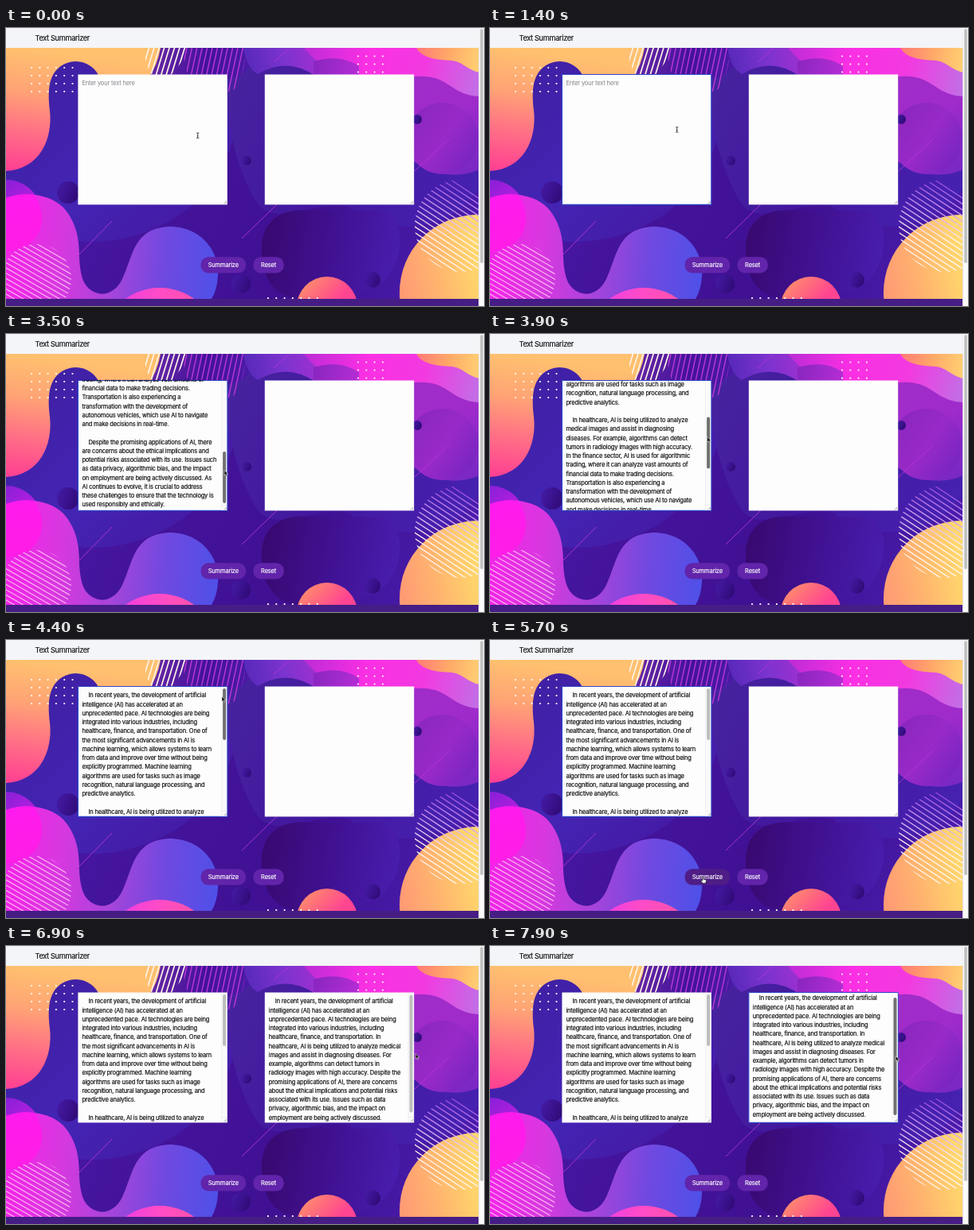
Animation, 600 px wide and 350 px high, one loop 8 s. Source, as an HTML page:

```html
<!DOCTYPE html>
<html lang="en">
<head>
<meta charset="utf-8">
<title>Text Summarizer</title>
<style>
html, body { margin: 0; width: 100%; height: 100%; overflow: hidden; background: #fff; }
svg { display: block; width: 600px; height: 350px; }
text { font: 7.5px Inter, Roboto, sans-serif; letter-spacing: -.18px; stroke-width: .16px; }
</style>
</head>
<body>
<svg id="stage" viewBox="0 0 600 350">
  <defs>
    <clipPath id="art"><rect y="25" width="593.5" height="316"/></clipPath>
    <clipPath id="hatchA"><path d="M176 25H226Q222 46 206 60H184Q176 50 174 34Z"/></clipPath>
    <clipPath id="hatchB"><path d="M222 25H301Q300 62 284 80H240Q224 60 222 26Z"/></clipPath>
    <clipPath id="hatchC"><circle cx="571" cy="249" r="58"/></clipPath>
    <clipPath id="hatchD"><circle cx="38" cy="316" r="44"/></clipPath>
  </defs>
  <g id="backdrop" clip-path="url(#art)"></g>
  <rect y="341" width="593.5" height="9" fill="#451d85"/>
  <rect width="594" height="25" fill="#f3f5f8"/>
  <text x="36.5" y="16" style="font-size:9.2px;letter-spacing:-.32px" fill="#101012" stroke="#101012">Text Summarizer</text>
  <rect x="593.5" width="6.5" height="350" fill="#fafafa"/>
  <rect x="593.5" width=".5" height="350" fill="#e6e6e6"/>
  <rect x="595.3" y="1" width="3.6" height="295" rx="1.8" fill="#bfbfbf"/>
  <g id="ui"></g>
  <g id="cursor"></g>
</svg>
<script>
const NS = 'http://www.w3.org/2000/svg';
const $ = id => document.getElementById(id);

function add(parent, tag, attrs, text) {
  const el = document.createElementNS(NS, tag);
  for (const k in attrs) el.setAttribute(k, attrs[k]);
  if (text) el.textContent = text;
  parent.appendChild(el);
  return el;
}

// ---- backdrop ----
const art = $('backdrop'), defs = document.querySelector('defs');
let gradCount = 0;

// Linear gradient from (x1,y1) to (x2,y2) in stage units.
function grad(x1, y1, x2, y2, ...colors) {
  const id = 'g' + gradCount++;
  const g = add(defs, 'linearGradient', { id, x1, y1, x2, y2, gradientUnits: 'userSpaceOnUse' });
  colors.forEach((c, i) => add(g, 'stop', { offset: i / (colors.length - 1), 'stop-color': c }));
  return `url(#${id})`;
}
const shape = (d, fill) => add(art, 'path', { d, fill });
const disc = (cx, cy, r, fill) => add(art, 'circle', { cx, cy, r, fill });
const line = (d, stroke, w, more) => add(art, 'path', { d, stroke, 'stroke-width': w, fill: 'none', ...more });

function dots(x0, y0, cols, rows) {
  for (let r = 0; r < rows; r++)
    for (let c = 0; c < cols; c++) disc(x0 + c * 10.3, y0 + r * 10, 1.1, '#fff');
}

function hatch(clip, x, y, dx, dy, stepX, stepY, n, stroke, w) {
  let d = '';
  for (let i = 0; i < n; i++) d += `M${x + i * stepX} ${y + i * stepY}l${dx} ${dy}`;
  line(d, stroke, w, { 'clip-path': `url(#${clip})` });
}

function drawBackdrop() {
  add(art, 'rect', { y: 25, width: 594, height: 317, fill: grad(0, 60, 594, 300, '#4a1cae', '#44149c', '#3f1092', '#4a1eaf') });
  // blue blobs
  shape('M0 170Q40 168 54 130V25H300C305 100 282 180 235 222C190 262 120 278 70 264C30 252 0 225 0 190Z',
    grad(50, 50, 250, 260, '#3f20a4', '#4424b4', '#4418a2'));
  shape('M278 60C300 40 350 40 400 60H593V200C560 260 470 262 430 225C390 215 345 250 318 224C300 200 272 130 278 60Z',
    grad(280, 60, 590, 220, '#46239f', '#42179e', '#4622b2'));
  shape('M321 284C318 244 345 226 380 230H470C505 236 500 300 470 322C440 341 405 345 365 341C335 336 323 315 321 284Z',
    grad(320, 260, 500, 290, '#38096f', '#401192', '#4a1eb0'));

  // top edge
  shape('M180 25H320Q306 64 270 64H180Z', grad(190, 26, 310, 50, '#6426a6', '#43129a', '#4b1ba6'));
  shape('M298 25H400Q410 48 388 60Q352 36 316 58Q302 50 298 25Z', grad(298, 50, 400, 30, '#5428b8', '#7c33cf', '#a52fd0'));
  shape('M508 56H594V178C570 190 530 186 508 164Z',
    grad(512, 60, 594, 170, '#a02cc8', '#a02bcb', '#7a28c4'));
  shape('M374 25H594V86C570 85 562 74 546 66C522 55 500 66 480 60C430 62 400 58 374 25Z',
    grad(380, 30, 594, 80, '#c02cd6', '#fb2fe4', '#f23ae0', '#c070e6'));
  shape('M386 42Q420 32 443 48V60H386Z', grad(386, 45, 443, 55, '#8a26c0', '#b42dd4'));
  disc(548, 139, 45, grad(505, 110, 592, 170, '#8a26bd', '#982ac8', '#7424c0'));
  shape('M515 25H594V56C578 52 574 43 560 41C540 40 522 38 515 25Z', grad(515, 30, 594, 40, '#ff7a78', '#ffa868', '#ffcf72'));

  // peach corner
  shape('M0 25H194Q190 48 178 64H118C112 46 92 37 74 45C53 55 52 78 55 104C59 140 42 178 0 180Z',
    grad(30, 28, 10, 180, '#ffc06f', '#ffa375', '#ff6f86', '#ff3f92'));

  // lower left
  disc(0, 236, 45, grad(0, 192, 45, 250, '#8a1fd8', '#b01fde', '#a019d4'));
  shape('M0 214C26 205 56 210 72 226C88 244 92 264 92 290C93 308 96 321 104 328C118 340 136 336 146 316C160 286 160 252 205 250C246 250 268 282 266 312Q265 330 258 341H0Z',
    grad(0, 270, 266, 290, '#f423e8', '#d838e0', '#a844da', '#7049e0', '#4f50e8'));
  shape('M0 214C14 209 28 208 36 211Q45 224 45 240C45 264 26 281 0 281Z', grad(0, 212, 20, 281, '#ff1bee', '#ff1de6'));
  disc(193, 400, 73, grad(150, 330, 237, 341, '#f040de', '#ff4cc6', '#ff52ac'));

  // lower right
  disc(592, 333, 98, grad(494, 320, 594, 300, '#ff9a74', '#ffb66e', '#ffd86c'));
  disc(403, 351, 38, grad(385, 315, 415, 345, '#ff8670', '#ff6480', '#ff4492'));

  // shaded balls
  [[78, 207, 14], [302, 167, 6], [516, 115, 6], [295, 322, 12], [460, 317, 10]].forEach(([x, y, r]) =>
    disc(x, y, r, grad(x - r, y - r * .4, x + r, y + r * .4, '#431aa2', '#3a128e', '#2f0a74')));

  hatch('hatchA', 181, 20, -14, 46, 6.4, 0, 10, '#fff2e6', 1.7);
  hatch('hatchB', 228, 20, -14, 66, 6.4, 0, 15, '#b535d4', 1.5);
  hatch('hatchC', 505, 156, 100, 66, 0, 7.4, 22, grad(560, 190, 545, 300, '#8c3fdc', '#c890ee', '#fff4ea', '#fff4ea'), 1.4);
  hatch('hatchD', -8, 238, 100, 58, 0, 6.6, 18, '#ffb4f2', 1.2);

  line('M88 289L133 243M296 265L340 222M513 180L557 139M336 43L355 26', '#b435d4', .9);
  dots(32, 50, 6, 4);
  dots(442, 35.5, 4, 3);
  dots(329, 340, 7, 1);
}
drawBackdrop();

// ---- interface ----
// A leading ">" marks an indented paragraph start.
const article = `>In recent years, the development of artificial
intelligence (AI) has accelerated at an
unprecedented pace. AI technologies are being
integrated into various industries, including
healthcare, finance, and transportation. One of
the most significant advancements in AI is
machine learning, which allows systems to learn
from data and improve over time without being
explicitly programmed. Machine learning
algorithms are used for tasks such as image
recognition, natural language processing, and
predictive analytics.

>In healthcare, AI is being utilized to analyze
medical images and assist in diagnosing
diseases. For example, algorithms can detect
tumors in radiology images with high accuracy.
In the finance sector, AI is used for algorithmic
trading, where it can analyze vast amounts of
financial data to make trading decisions.
Transportation is also experiencing a
transformation with the development of
autonomous vehicles, which use AI to navigate
and make decisions in real-time.

>Despite the promising applications of AI, there
are concerns about the ethical implications and
potential risks associated with its use. Issues such
as data privacy, algorithmic bias, and the impact
on employment are being actively discussed. As
AI continues to evolve, it is crucial to address
these challenges to ensure that the technology is
used responsibly and ethically.`;

const summary = `>In recent years, the development of artificial
intelligence (AI) has accelerated at an
unprecedented pace. AI technologies are being
integrated into various industries, including
healthcare, finance, and transportation. In
healthcare, AI is being utilized to analyze medical
images and assist in diagnosing diseases. For
example, algorithms can detect tumors in
radiology images with high accuracy. Despite the
promising applications of AI, there are concerns
about the ethical implications and potential risks
associated with its use. Issues such as data
privacy, algorithmic bias, and the impact on
employment are being actively discussed.`;

const ui = $('ui');
const show = (el, on) => el.setAttribute('display', on ? 'inline' : 'none');

function textArea(x, content, thumbLen) {
  const box = { x, y: 58.5, width: 187.4, height: 163.9 };
  const clip = 'box' + x;
  add(add(defs, 'clipPath', { id: clip }), 'rect', { ...box, y: 57.8 });
  add(ui, 'rect', { ...box, fill: '#fdfdfd' });
  const ring = add(ui, 'rect', { ...box, rx: .8, fill: 'none', stroke: '#3048c6', 'stroke-width': 1.2 });

  const full = add(ui, 'g', { 'clip-path': `url(#${clip})` });
  const lines = add(full, 'g', { fill: '#0a0a0c', stroke: '#0a0a0c' });
  content.split('\n').forEach((s, i) => {
    const indent = s[0] === '>';
    if (s) add(lines, 'text', { x: x + (indent ? 13 : 5), y: 72.3 + i * 11.25 }, s.slice(indent ? 1 : 0));
  });
  const bar = x + 180;
  add(full, 'rect', { x: bar, y: 59, width: 6.9, height: 163, fill: '#fafafa' });
  add(full, 'rect', { x: bar, y: 59, width: .5, height: 163, fill: '#e4e4e4' });
  add(full, 'path', { d: `M${bar} 215.5h7`, stroke: '#dedede', 'stroke-width': .5 });
  const thumb = add(full, 'rect', { x: bar + 1.7, width: 4, height: thumbLen, rx: 2 });

  add(ui, 'path', { d: `M${x + 183} 221.4l3.6-3.6M${x + 185} 221.4l1.6-1.6`, stroke: '#777', 'stroke-width': .6 });

  return ({ filled, focus, scroll, thumbY, active }) => {
    show(full, filled);
    show(ring, focus);
    lines.setAttribute('transform', `translate(0 ${-scroll})`);
    thumb.setAttribute('y', thumbY);
    thumb.setAttribute('fill', active ? '#717171' : '#bdbdbd');
  };
}

function button(x, width, label) {
  const face = add(ui, 'rect', { x, y: 288.3, width, height: 20.2, rx: 9.6 });
  add(ui, 'text', { x: x + width / 2, y: 301.2, fill: '#fff', stroke: '#fff', 'text-anchor': 'middle' }, label);
  return hover => face.setAttribute('fill', hover ? '#4f1d86' : '#6124aa');
}

const setLeft = textArea(90.4, article, 65);
const setRight = textArea(324.8, summary, 148);
const hint = add(ui, 'text', { x: 95.4, y: 72.3, fill: '#808489' }, 'Enter your text here');
const setSummarize = button(244.5, 56.6, 'Summarize');
const setReset = button(310.4, 38.4, 'Reset');

// ---- pointer ----
const pointer = $('cursor');
const beam = add(pointer, 'path', {
  d: 'M-1.7-3.4Q0-3.4 0-2.4Q0-3.4 1.7-3.4M0-2.6V2.6M-1.7 3.4Q0 3.4 0 2.4Q0 3.4 1.7 3.4M-.9 .6H.9',
  fill: 'none', stroke: '#222', 'stroke-width': .8
});
const arrow = add(pointer, 'path', {
  d: 'M0 0V6.6L1.5 5.2L2.6 7.6L3.7 7.1L2.7 4.8H4.7Z', fill: '#111', stroke: '#fff', 'stroke-width': .5
});
const hand = add(pointer, 'path', {
  d: 'M-1.2-3.4Q-.5-4.4 .2-3.4V-.8L2.6-.3Q3.6 0 3.4 1.2L2.8 4H-1.2L-3.2 1Q-3-.2-1.2 .9Z',
  fill: '#fff', stroke: '#111', 'stroke-width': .7
});

// time, x, y
const route = [
  [0, 240.7, 135.4], [500, 240.7, 135.4], [1400, 234.7, 128], [2200, 235, 129],
  [3100, 274, 171], [3500, 274, 171.5], [4400, 271, 71], [4600, 271, 72],
  [5500, 268, 302], [6000, 268, 302.4], [6900, 514, 135.5], [7400, 509.2, 136], [7900, 509.2, 138.4]
];
const ease = u => u * u * (3 - 2 * u);
const ramp = (t, a, b) => ease(Math.min(1, Math.max(0, (t - a) / (b - a))));

function place(t) {
  const i = route.findIndex(k => k[0] > t);
  if (i < 0) return route[route.length - 1].slice(1);
  const [t0, x0, y0] = route[i - 1], [t1, x1, y1] = route[i];
  const u = ramp(t, t0, t1);
  return [x0 + (x1 - x0) * u, y0 + (y1 - y0) * u];
}
const within = (x, y, l, t, r, b) => x > l && x < r && y > t && y < b;

function render(t) {
  const [x, y] = place(t);
  const pasted = t >= 1900, done = t >= 6400;
  const up = ramp(t, 3500, 4300);
  const down = ramp(t, 7400, 7800);

  setLeft({
    filled: pasted, focus: t >= 1000 && t < 6000,
    scroll: 215 * (1 - up), thumbY: 148 - 87 * up,
    active: pasted && within(x, y, 270.4, 58, 278, 222)
  });
  setRight({
    filled: done, focus: t >= 7300,
    scroll: 4 * down, thumbY: 61.5 + 3.5 * down,
    active: done && within(x, y, 504.8, 58, 512.2, 222)
  });
  show(hint, !pasted);

  const overSum = within(x, y, 244, 288, 301, 308.5);
  const overReset = within(x, y, 310, 288, 349, 308.5);
  setSummarize(overSum);
  setReset(overReset);

  const inLeft = within(x, y, 90.4, 58.7, pasted ? 270.4 : 277.8, 222);
  const inRight = within(x, y, 324.8, 58.7, done ? 504.8 : 512.2, 222);
  const kind = overSum || overReset ? hand : inLeft || inRight ? beam : arrow;
  [beam, arrow, hand].forEach(c => show(c, c === kind));
  pointer.setAttribute('transform', `translate(${x} ${y})`);
}

function tick() {
  render(Math.floor(performance.now() % 8000 / 100) * 100);
  requestAnimationFrame(tick);
}
tick();
</script>
</body>
</html>
```
